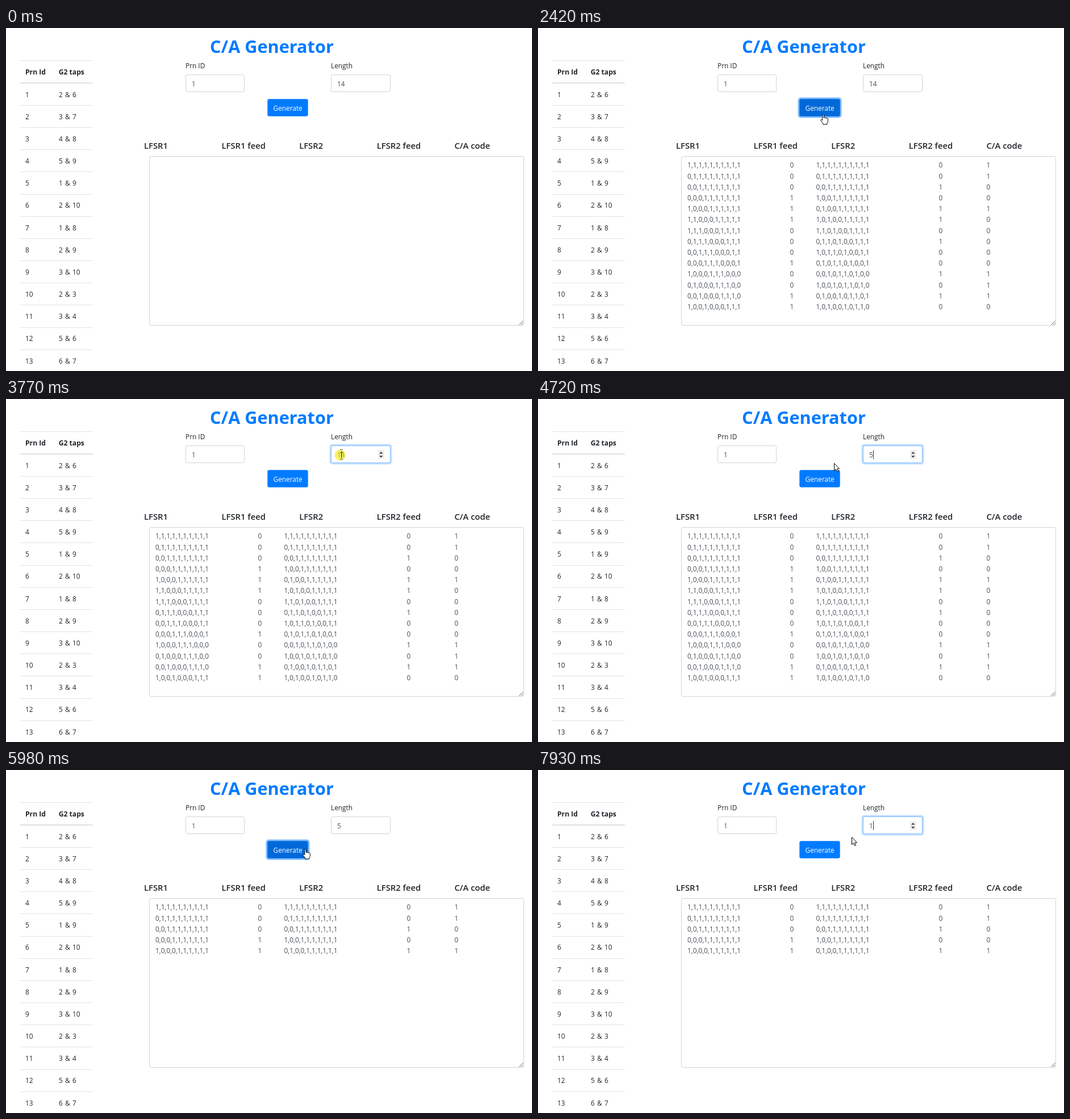
An HTML page that plays this animation: 926x605 px, repeating every 8 s.

```html
<!DOCTYPE html>
<html lang="en">
<head>
<meta charset="utf-8">
<title>C/A Generator</title>
<style>
  html, body { margin: 0; width: 100%; height: 100%; overflow: hidden; background: #fff; }
  svg { display: block; width: 926px; height: 605px; }
  text { font: 11.87px "Open Sans", "Noto Sans", sans-serif; fill: #212529; }
  .title { font-size: 30.65px; font-weight: 700; fill: #007bff; }
  .head { font-size: 14.8px; font-weight: 600; }
  .th { font-size: 12.15px; font-weight: 700; }
  .taps { word-spacing: .1em; }
  .val { fill: #495057; }
  .rule { fill: #dee2e6; }
  .box { fill: #fff; stroke: #ced4da; }
  .ring { fill: #007bff; }
  .ptr { fill: #fff; stroke: #000; stroke-linejoin: round; }
</style>
</head>
<body>
<svg viewBox="0 0 926 605">
  <g id="page">
    <text class="title" x="359" y="44">C/A Generator</text>
    <text x="316" y="71">Prn ID</text>
    <text x="572" y="71">Length</text>
  </g>

  <rect class="box" x="316.5" y="82.5" width="103" height="30" rx="2.7"/>
  <text class="val" x="327" y="103">1</text>

  <rect id="fieldRing" class="ring" x="569.5" y="79.5" width="110" height="36" rx="5"/>
  <rect id="field" class="box" x="572.5" y="82.5" width="104" height="30" rx="2.7"/>
  <rect id="sel" x="583" y="89" height="17" fill="#3390ff"/>
  <text id="len" class="val" x="583" y="103"></text>
  <rect id="caret" x="590" y="90" width="1" height="16" fill="#333"/>
  <g id="spin">
    <rect x="655" y="90" width="11" height="16" fill="#efefef"/>
    <path d="M657 96.5l3.3-3.5 3.3 3.5zM657 100l3.3 3.5 3.3-3.5z" fill="#444"/>
  </g>

  <rect id="btnRing" class="ring" x="457.5" y="122.5" width="77" height="36" rx="5"/>
  <rect id="btn" x="460.3" y="125.3" width="71.4" height="30.4" rx="3.2"/>
  <text x="470.5" y="146" style="fill:#fff">Generate</text>

  <rect class="box" x="252.5" y="226.5" width="659" height="298" rx="2.7"/>
  <path d="M903.5 523.5l7-7M907.5 523.5l3-3" stroke="#5a5a66" fill="none"/>
  <g id="rows"></g>

  <g id="cursor">
    <circle id="press" r="9.5" fill="#f0e800" opacity=".6"/>
    <path id="arrow" class="ptr" d="M.5 .5V13.6L3.4 10.9 5.4 15.5 7.5 14.6 5.6 10.1H9.6Z"/>
    <path id="hand" class="ptr" d="M-1.2 1.2Q0-.4 1.2 1.2V6.4Q2.6 5.3 3.6 6.7 5 5.8 6 7.2 7.8 6.6 8.4 8.4V12.5Q8.2 14.5 6.8 16V18H-.2V16.5L-4.2 11Q-4 9-2.6 9.4L-1.2 10.8Z"/>
    <path id="beam" d="M2.5-7V6M.5-4.5H5M0-9.5H2M3-9.5H5M0 7.5H2M3 7.5H5" stroke="#333" fill="none"/>
  </g>
</svg>
<script>
const LOOP = 8000, START = 290, STEP = 78.7;
const $ = id => document.getElementById(id);
const NS = 'http://www.w3.org/2000/svg';

function add(parent, tag, attrs, content = '') {
  const el = document.createElementNS(NS, tag);
  for (const k in attrs) el.setAttribute(k, attrs[k]);
  el.textContent = content;
  parent.append(el);
  return el;
}
const label = (parent, cls, x, y, s) => add(parent, 'text', { class: cls, x, y }, s);
const rule = (y, height) => add(page, 'rect', { class: 'rule', x: 25, y, width: 128, height });

const page = $('page');
['LFSR1', 'LFSR1 feed', 'LFSR2', 'LFSR2 feed', 'C/A code']
  .forEach((s, i) => label(page, 'head', 243 + 136.6 * i, 213, s));

// Tap table: runs of consecutive pairs as first tap, gap, count
rule(57, 1);
rule(96, 2);
label(page, 'th', 34, 82, 'Prn Id');
label(page, 'th', 92.7, 82, 'G2 taps');
let prn = 0;
for (const [first, gap, count] of [[2, 4, 4], [1, 8, 2], [1, 7, 3], [2, 1, 2], [5, 1, 2]]) {
  for (let tap = first; tap < first + count; tap++, prn++) {
    const y = Math.round(121.6 + 39.17 * prn);
    label(page, '', 34, y, prn + 1);
    label(page, 'taps', 93, y, `${tap} & ${tap + gap}`);
    rule(Math.round(135.9 + 39.17 * prn), 1);
  }
}

// Both shift registers start with all ones
const xor = (reg, ...taps) => taps.reduce((sum, n) => sum ^ reg[n - 1], 0);
const rows = [];
let g1 = Array(10).fill(1), g2 = [...g1];
for (let i = 0; i < 14; i++) {
  const f1 = xor(g1, 3, 10), f2 = xor(g2, 2, 3, 6, 8, 9, 10);
  const row = add($('rows'), 'g', {});
  const put = (x, v) => label(row, 'val', x, Math.round(246.4 + 19.2 * i), String(v));
  put(263, g1);
  put(443.5, f1);
  put(489.5, g2);
  put(705.5, f2);
  put(789.5, g1[9] ^ xor(g2, 2, 6));
  rows.push(row);
  g1 = [f1, ...g1.slice(0, 9)];
  g2 = [f2, ...g2.slice(0, 9)];
}

// Two rounds of generate, enter the field, type
const GEN = [2255, 5480], ENTER = [3610, 6595], TYPE = [4380, 7470];
const SELECT = ENTER.map(t => t + 385);

// Pointer moves: start, end, target
const moves = [
  [START, 1080, 490, 175],
  [1100, 1620, 499, 146],
  [2340, 2810, 545, 234],
  [2890, 3200, 614, 129],
  [3200, 3600, 588, 99],
  [4230, 4690, 521, 113],
  [4880, 5340, 522, 142],
  [5830, 6600, 588, 99],
  [7060, 7540, 563, 117],
  [7845, 7920, 552, 118]
];
const clamp = v => Math.min(1, Math.max(0, v));
const ease = v => v * v * (3 - 2 * v);

function pointer(t) {
  let x = 828, y = 597;
  for (const [from, to, tx, ty] of moves) {
    const k = ease(clamp((t - from) / (to - from)));
    x += (tx - x) * k;
    y += (ty - y) * k;
  }
  return [Math.round(x), Math.round(y)];
}

const inside = ([x, y], l, t, r, b) => x >= l && x <= r && y >= t && y <= b;
const onButton = p => inside(p, 460, 125, 532, 156);
const onField = p => inside(p, 572, 82, 677, 113);
const onOutput = p => inside(p, 252, 226, 912, 525);

const within = (t, from, to) => t >= from && t < to;
const held = (t, starts, ms) => starts.some(s => within(t, s, s + ms));
const fade = (t, on, off) => on.reduce((v, s, i) =>
  v + clamp((t - s) / 150) - clamp((t - (off[i] || 2 * LOOP)) / 150), 0);
const mix = (a, b, k) => `rgb(${a.map((v, i) => Math.round(v + (b[i] - v) * k))})`;
const show = (id, on) => { $(id).style.display = on ? '' : 'none'; };

function draw(time) {
  // The screen is refreshed in coarse steps
  const t = START + Math.floor((time - START) / STEP) * STEP;
  const at = pointer(t);
  const hand = onButton(at), beam = onField(at) || onOutput(at);

  show('cursor', t >= START);
  show('hand', hand);
  show('beam', beam);
  show('arrow', !hand && !beam);
  show('press', held(t, [...GEN, ...SELECT], 80) || held(t, ENTER, 300));
  $('cursor').setAttribute('transform', `translate(${at})`);

  const focus = fade(t, ENTER, GEN.slice(1));
  $('fieldRing').setAttribute('opacity', .25 * focus);
  $('field').style.stroke = mix([206, 212, 218], [128, 189, 255], focus);
  $('btnRing').setAttribute('opacity', .5 * fade(t, GEN, ENTER));
  const hover = (hand + onButton(pointer(t - STEP))) / 2;
  $('btn').style.fill = mix([0, 123, 255], [0, 105, 217], hover);

  const value = t < TYPE[0] ? '14' : t < TYPE[1] ? '5' : '1';
  const selected = SELECT.some((s, i) => within(t, s, TYPE[i]));
  $('len').textContent = value;
  $('len').style.fill = selected ? '#fff' : '';
  $('sel').setAttribute('width', 7 * value.length);
  show('sel', selected);
  show('caret', held(t, TYPE, 560));
  show('spin', onField(at) || within(t, ENTER[0], GEN[1]) || t >= ENTER[1]);

  const count = t < GEN[0] + 75 ? 0 : t < GEN[1] + 75 ? 14 : 5;
  rows.forEach((row, i) => { row.style.display = i < count ? '' : 'none'; });
}

function tick() {
  draw(performance.now() % LOOP);
  requestAnimationFrame(tick);
}
tick();
</script>
</body>
</html>
```
